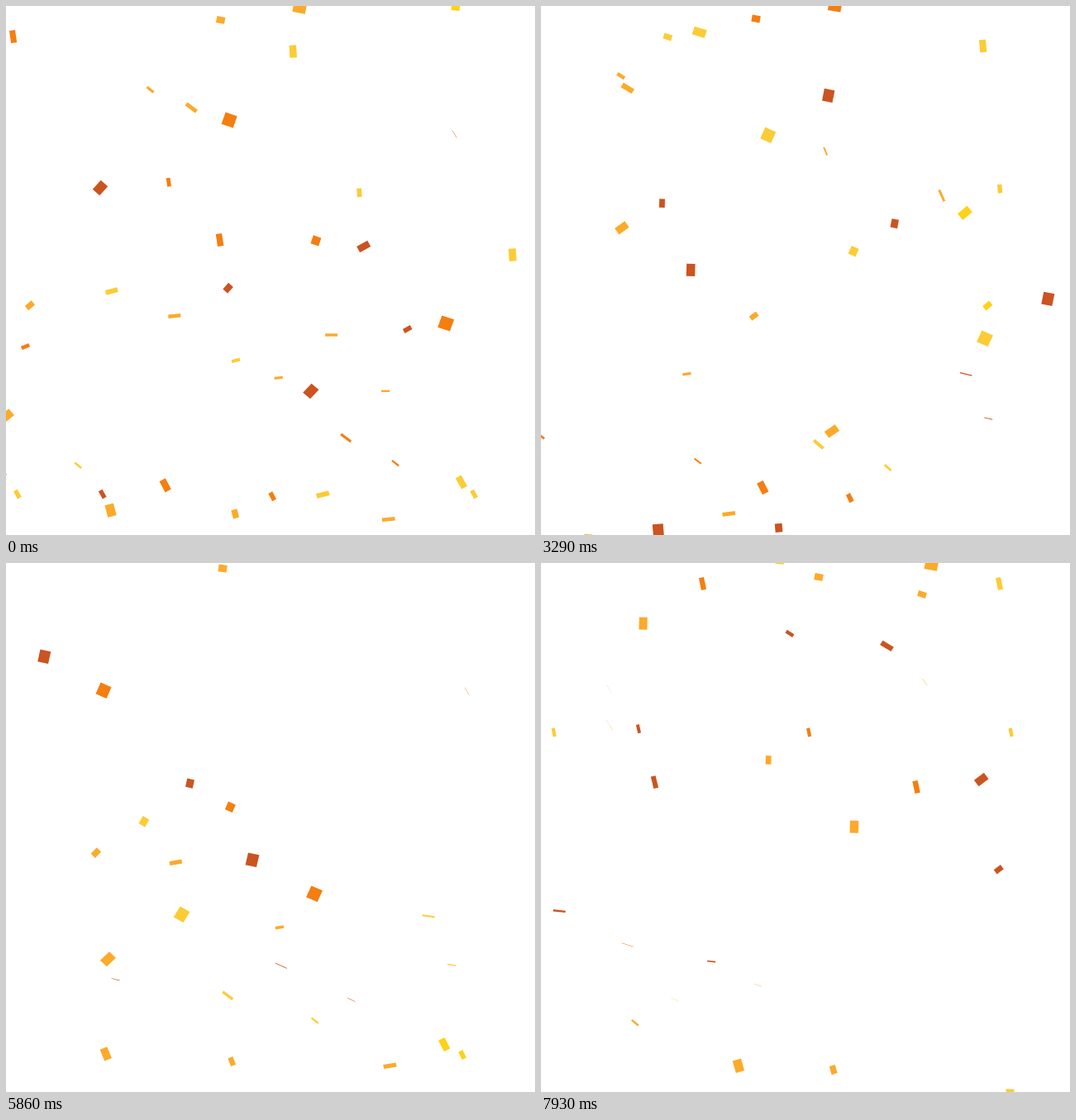
Animation of 640x640 px, one loop 8000 ms. Source, as an HTML page with a canvas:

```html
<!DOCTYPE html>
<html lang="en">
<head>
<meta charset="utf-8">
<title>Falling confetti</title>
<style>
  html, body { margin: 0; height: 100%; overflow: hidden; background: #fff; }
  canvas { display: block; width: 100vw; height: 100vh; }
</style>
</head>
<body>
<canvas id="stage" width="640" height="640"></canvas>
<script>
const ctx = document.getElementById('stage').getContext('2d');

const LOOP = 8000, SHOWN_FRAMES = 112, TICK = 40;
const SPEED = 5.92;  // travel per tick
const SIZE = 15;

const COLORS = { r: '#cb5421', o: '#f57e10', a: '#fcaa2a', y: '#fbcc35', g: '#ffd117' };

// The same shower is shown three times: [scaleX, scaleY, offsetX, offsetY]
const COPIES = [
  [0.681, 0.7, 191, 187.3],
  [1.046, 1, 249.6, 246],
  [1, 1, 0, 0]
];

// Every piece follows one path: [colour, column, travel at the start]
const PIECES = [
  ['o', 10, 37], ['a', 123, -223], ['g', 535, -241], ['y', 347, 55], ['a', 10, -123],
  ['o', 273, 138], ['r', 535, -46], ['r', 130, 220], ['r', 461, 291], ['y', 160, 345],
  ['a', 235, 375], ['a', 422, 398], ['o', -215, 321], ['a', -216, 250], ['o', 423, 534],
  ['y', -141, 540], ['y', -254, 619], ['r', -103, 619], ['o', 198, 625], ['a', 124, 673],
  ['y', 557, 619], ['r', 348, -383], ['y', 280, -335], ['r', -66, -418], ['a', 237, -508],
  ['y', 535, -443], ['o', 123, -716], ['y', -27, -691], ['a', -102, -637], ['r', 47, -757],
  ['r', 557, -916], ['r', -104, -1159], ['y', -255, -1153], ['o', 198, -1153],
  ['y', 557, -1153], ['a', 123, -1105], ['g', 159, -1424], ['a', 235, -1401],
  ['a', 425, -1377], ['r', 198, -1323], ['a', 423, -1240], ['a', -140, -1228]
];

// Tracks are [travel, value] keys, joined by straight lines
const HEIGHT = [[-542, -643], [-142, -142], [503, 503], [903, 755]];
const THICKNESS = [[-273, 15], [-53, 0], [137, 15], [475, 0], [750, 15]];
const SWAY = [
  -11, -23, -33.5, -37, -30.5, -21.5, -13, -3, 0.7, 0.4, -3, -8.5, -16, -24,
  -29.5, -32.3, -31, -25, -18.5, -13.5, -11.5, -9.5, -6, -0.5, 9, 19, 29
].map((value, i) => [-260 + 40 * i, value]);

function track(keys, travel) {
  let i = 1;
  while (i < keys.length - 1 && travel > keys[i][0]) i++;
  const [p0, v0] = keys[i - 1], [p1, v1] = keys[i];
  return v0 + (v1 - v0) * (travel - p0) / (p1 - p0);
}

function drawPiece([color, column, start], tick) {
  const travel = start + SPEED * tick;
  if (travel < -300 || travel > 800) return;
  const thickness = Math.min(SIZE, Math.abs(track(THICKNESS, travel)));
  ctx.save();
  ctx.translate(column + track(SWAY, travel), track(HEIGHT, travel));
  ctx.rotate((travel - 398) * 0.2725 * Math.PI / 180);
  ctx.fillStyle = COLORS[color];
  ctx.fillRect(-SIZE / 2, -thickness / 2, SIZE, thickness);
  ctx.restore();
}

function draw(now) {
  const hold = LOOP / SHOWN_FRAMES;
  const frame = Math.floor((now % LOOP + 5) / hold) % SHOWN_FRAMES;
  const tick = Math.ceil(frame * hold / TICK);
  ctx.setTransform(1, 0, 0, 1, 0, 0);
  ctx.fillStyle = '#fff';
  ctx.fillRect(0, 0, 640, 640);
  for (const [scaleX, scaleY, x, y] of COPIES) {
    ctx.setTransform(scaleX, 0, 0, scaleY, x, y);
    PIECES.forEach(piece => drawPiece(piece, tick));
  }
}

const begin = performance.now();
function loop() {
  draw(performance.now() - begin);
  requestAnimationFrame(loop);
}
loop();
</script>
</body>
</html>
```
